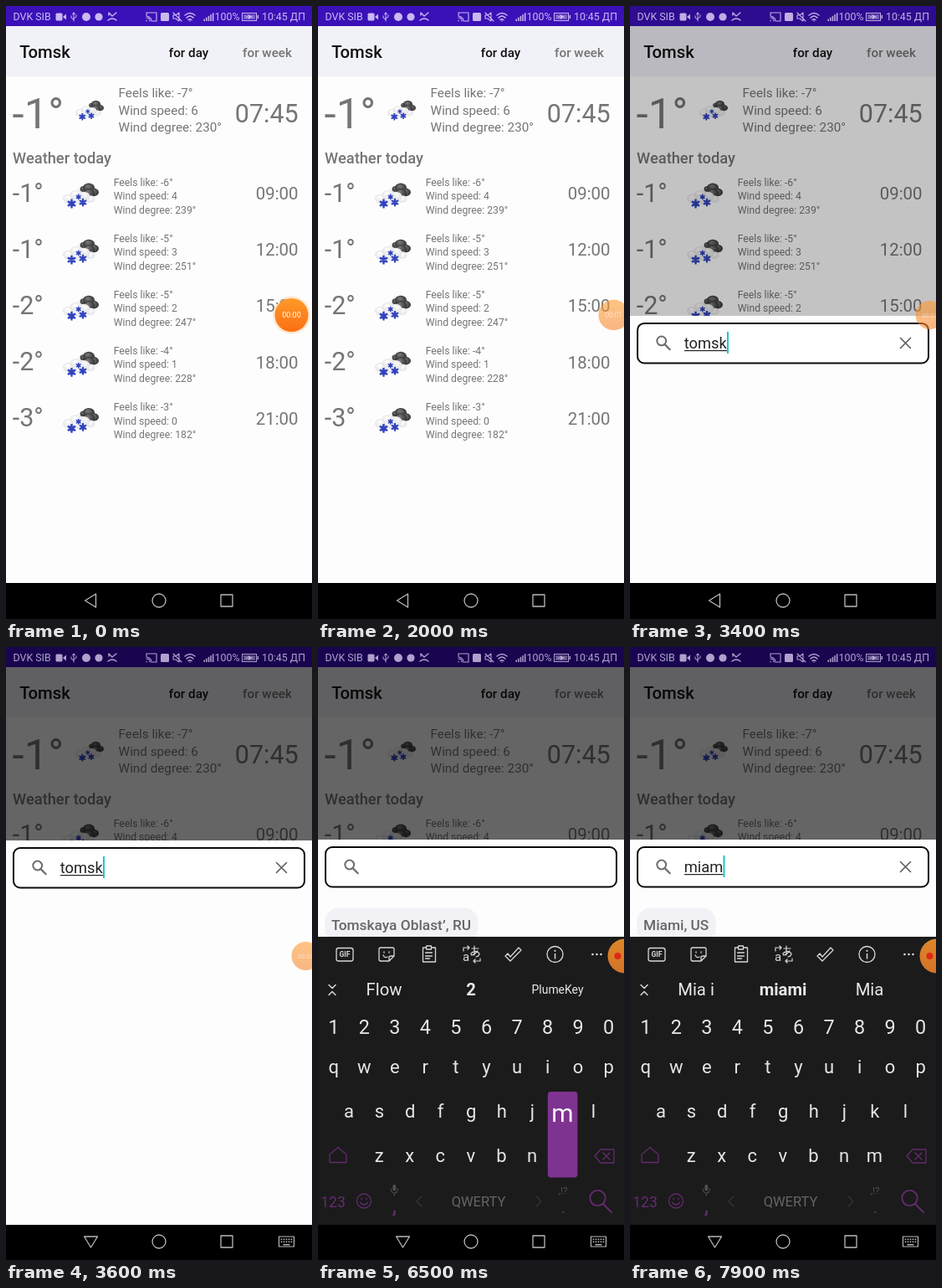
An HTML page with a canvas for the animation above (8 s loop, 366 by 732 pixels).

```html
<!DOCTYPE html>
<html lang="en">
<head>
<meta charset="utf-8">
<title>Weather app</title>
<style>
html, body { margin: 0; width: 100%; height: 100%; overflow: hidden; background: #000; }
canvas { display: block; width: 366px; height: 732px; }
</style>
</head>
<body>
<canvas id="stage"></canvas>
<script>
const W = 366, H = 732, LOOP = 8000;
const canvas = document.getElementById('stage');
const c = canvas.getContext('2d');
const dpr = window.devicePixelRatio || 1;
canvas.width = W * dpr;
canvas.height = H * dpr;

const GREY = '#757575', PURPLE = '#642b70', KEY = '#e6e6e6';
const clamp = v => Math.max(0, Math.min(1, v));
const span = (t, a, b) => clamp((t - a) / (b - a));
const easeOut = p => 1 - (1 - p) ** 3;
const mix = (a, b, p) => a + (b - a) * p;

function font(size, weight = 400) {
  c.font = `${weight} ${size}px Roboto, "Open Sans", sans-serif`;
}
function text(s, x, y, size, color = GREY, weight = 400, align = 'left') {
  font(size, weight);
  c.fillStyle = color;
  c.textAlign = align;
  c.fillText(s, x, y);
}
function rect(x, y, w, h, color) {
  c.fillStyle = color;
  c.fillRect(x, y, w, h);
}
function round(x, y, w, h, r, color) {
  c.beginPath();
  c.roundRect(x, y, w, h, r);
  c.fillStyle = color;
  c.fill();
}
function dot(x, y, r, color) {
  c.beginPath();
  c.arc(x, y, r, 0, 7);
  c.fillStyle = color;
  c.fill();
}
function ring(x, y, r, color, lw = 1.3) {
  c.beginPath();
  c.arc(x, y, r, 0, 7);
  c.strokeStyle = color;
  c.lineWidth = lw;
  c.stroke();
}
// Strokes an SVG path placed around a centre point
function icon(x, y, d, color, lw = 1.3) {
  c.save();
  c.translate(x, y);
  c.strokeStyle = color;
  c.lineWidth = lw;
  c.lineCap = c.lineJoin = 'round';
  c.stroke(new Path2D(d));
  c.restore();
}

// Flattened puff, shaded from the upper left
function puff(x, y, r, light, dark) {
  c.save();
  c.translate(x, y);
  c.scale(1, .78);
  const g = c.createRadialGradient(-r * .2, -r * .4, r * .1, 0, 0, r);
  g.addColorStop(0, light);
  g.addColorStop(1, dark);
  dot(0, 0, r, g);
  c.restore();
}
function flake(x, y, r) {
  c.strokeStyle = '#3244bd';
  c.lineWidth = r * .42;
  c.beginPath();
  for (let i = 0; i < 6; i++) {
    const a = (i + .5) * Math.PI / 3;
    c.moveTo(x, y);
    c.lineTo(x + r * Math.cos(a), y + r * Math.sin(a));
  }
  c.stroke();
  ring(x, y, r * .55, 'rgba(50,68,189,.55)', r * .3);
}
function snowCloud(x, y, k) {
  c.save();
  c.translate(x, y);
  c.scale(k, k);
  for (const [px, py, r] of [[25, 7, 4.5], [31, 5.5, 7], [37, 11, 6], [31, 12, 7]])
    puff(px, py, r, '#777', '#343434');
  for (const [px, py, r] of [[33, 19, 5.5], [7, 18.5, 7], [25, 16, 7.5], [16, 14, 7.5], [19, 19, 8]])
    puff(px, py, r, '#fff', '#e4e4e7');
  flake(10.5, 24.5, 5.4);
  flake(24, 23, 4.8);
  flake(18.7, 16.5, 3.4);
  c.restore();
}

const hours = [
  ['-1°', '-6°', 4, 239, '09:00'],
  ['-1°', '-5°', 3, 251, '12:00'],
  ['-2°', '-5°', 2, 247, '15:00'],
  ['-2°', '-4°', 1, 228, '18:00'],
  ['-3°', '-3°', 0, 182, '21:00']
];

function details(x, y, step, size, feels, speed, degree) {
  text('Feels like: ' + feels, x, y, size);
  text('Wind speed: ' + speed, x, y + step, size);
  text(`Wind degree: ${degree}°`, x, y + 2 * step, size);
}

function weather(t) {
  rect(0, 24, W, 665, '#fdfdfd');
  rect(0, 24, W, 60, '#f1f1f8');
  text('Tomsk', 16.3, 62, 20.3, '#111', 500);
  text('for day', 218.5, 60.5, 15.25, '#111', 500, 'center');
  text('for week', 312.5, 60.5, 15.25, GREY, 500, 'center');

  text('-1°', 7.6, 146, 50.8);
  snowCloud(83, 113, .79);
  details(134.6, 109, 20.5, 15.25, '-7°', 6, 230);
  text('07:45', 349.7, 138.5, 30.5, GREY, 400, 'right');
  text('Weather today', 8.1, 188, 18.3, GREY, 500);

  hours.forEach(([temp, feels, speed, degree, time], i) => {
    const y = 193 + i * 67.1;
    text(temp, 7.8, y + 41, 30.5);
    snowCloud(68, y + 18.5, 1);
    details(128.7, y + 21.5, 16.6, 12.2, feels, speed, degree);
    text(time, 349.5, y + 38.2, 20.4, GREY, 400, 'right');
  });

  // Overscroll glow at the top of the list
  const g = Math.min(span(t, 2450, 2580), 1 - span(t, 2640, 2840));
  if (g > 0) {
    const s = .37 * g;
    c.save();
    c.beginPath();
    c.rect(0, 193, W, 120);
    c.clip();
    c.beginPath();
    c.ellipse(155, 193 - 476 * s, 549, 549 * s, 0, 0, 7);
    c.fillStyle = 'rgba(98,0,200,.08)';
    c.fill();
    c.restore();
  }
}

function statusBar(dim) {
  rect(0, 0, W, 24, `rgb(${mix(58, 25, dim)},${mix(17, 4, dim)},${mix(184, 80, dim)})`);
  const col = `rgba(238,228,255,${mix(.8, .7, dim)})`;
  text('DVK SIB', 8.5, 17.3, 12.4, col);
  round(59.5, 8.5, 8, 9, 1.5, col);
  c.beginPath();
  c.moveTo(68, 13); c.lineTo(72, 9.5); c.lineTo(72, 16.5);
  c.fill();
  icon(81, 13, 'M0 5V-5M-1.5-3L0-5 1.5-3M0 3L-3 1V-1M0 2L3 0V-2', col, 1);
  dot(96, 13, 5, col);
  dot(111, 13, 4.6, col);
  icon(127, 13, 'M-4-5L0-1 5-5M-4-5V-2M-5 4Q0 0 5 4', col, 1.4);
  icon(174, 13, 'M-6-2V-5H6V5H1M-6 1Q-2 1-2 5M-6-1Q0 0 0 5M-6 4V5', col, 1.1);
  round(185, 8, 10, 10, 1.5, col);
  icon(205, 13, 'M-5-2H-2L2-5V5L-2 2H-5ZM-5-5L5 5', col, 1.1);
  icon(220, 14, 'M-6-3Q0-8 6-3M-4 0Q0-4 4 0M-2 2.5Q0 1 2 2.5M0 4V4', col, 1.5);
  for (let i = 0; i < 5; i++) rect(236.5 + i * 2.6, 15.5 - i * 1.8, 1.5, 2.5 + i * 1.8, col);
  text('100%', 249.5, 17.3, 12.4, col);
  c.strokeStyle = col;
  c.lineWidth = 1;
  c.strokeRect(282.5, 8.5, 17, 9);
  rect(284, 10, 14, 6, 'rgba(238,228,255,.35)');
  rect(300.5, 11, 1.5, 4, col);
  icon(291, 13, 'M-4 0H4M-1-2L2 0-1 2', col, 1.1);
  text('10:45 ДП', 358, 17.3, 12.4, col, 400, 'right');
}

function navBar(t) {
  const ime = t >= 3500, col = '#b9b9b9', top = ime ? 690 : 689;
  rect(0, top, W, H - top, '#000');
  icon(101.5, 710, ime ? 'M-8-6H8L0 7Z' : 'M6-8V8L-7 0Z', col, 1.3);
  ring(183, 710, 8, col);
  icon(264, 710, 'M-7-7H7V7H-7Z', col);
  if (ime) {
    icon(335.5, 710, 'M-9-6H9V6H-9Z', col, 1.2);
    for (let r = 0; r < 2; r++)
      for (let i = 0; i < 5; i++) rect(328.7 + i * 3, 706.5 + r * 3, 1.6, 1.6, col);
    rect(331.5, 713, 8, 1.4, col);
  }
}

// [start, typed text, suggestions]
const typing = [
  [0, 'tomsk', ['tom', 'tomsk', 'Torviso']],
  [4700, '', ['Flow', '2', 'PlumeKey']],
  [6600, 'm', ['my', 'm', 'me']],
  [7000, 'mi', ['miss', 'mi', 'mine']],
  [7200, 'mia', ['Mia', 'mia', 'miami']],
  [7600, 'miam', ['Mia i', 'miami', 'Mia']]
];
// [from, to, letter, x, y]
const presses = [
  [6500, 6600, 'm', 292.5, 607],
  [6800, 7000, 'i', 275, 501],
  [7500, 7600, 'm', 292.5, 607],
  [7800, 7900, 'i', 275, 501]
];

function chip(label) {
  font(17.3, 500);
  const w = c.measureText(label).width;
  round(8, 311.5, w + 16.5, 41, 17, '#f1f1f6');
  text(label, 16, 338, 17.3, '#666', 500);
}

function sheet(t, typed, since) {
  const p = easeOut(span(t, 3300, 3590));
  c.save();
  c.translate(0, mix(502, 0, p) + (t < 3800 ? 1 : 0));
  rect(0, 230, W, 520, '#fdfdfd');
  c.beginPath();
  c.roundRect(9, 239, 348, 47.5, 8);
  c.fillStyle = '#fff';
  c.fill();
  c.strokeStyle = '#0a0a0a';
  c.lineWidth = 2;
  c.stroke();
  ring(37.7, 260, 5.4, '#6d6d6d', 2);
  icon(44.5, 267, 'M-2.6-2.6L3.2 3.2', '#6d6d6d', 2.2);
  text(typed, 64.8, 269, 18.3, '#222');
  const w = c.measureText(typed).width;
  if (typed) {
    rect(65, 271, w, 1.2, '#222');
    icon(329.5, 262.5, 'M-6-6L6 6M6-6L-6 6', '#5c5c5c', 1.6);
  }
  if (Math.floor((t - Math.max(since, 3600)) / 500) % 2 === 0 || t < 3600)
    rect(65 + w, 249, 2, 26, '#1fc6c4');
  if (t >= 4100 && t < 7000) chip('Tomskaya Oblast’, RU');
  if (t >= 7800) chip('Miami, US');
  c.restore();
}

function keyRow(keys, x, y, size) {
  [...keys].forEach((k, i) => text(k, x + i * 36.55, y, size, KEY, 400, 'center'));
}

function suggestion(s, x, weight) {
  font(20.3, weight);
  const size = 20.3 * Math.min(1, 62 / c.measureText(s).width);
  text(s, x, 409 + size * .34, size, '#e8e8e8', weight, 'center');
}

function toolbar() {
  const col = '#d8d8d8', y = 367;
  c.beginPath();
  c.roundRect(22, 359.5, 20, 15.5, 2.5);
  c.strokeStyle = col;
  c.lineWidth = 1.3;
  c.stroke();
  text('GIF', 32, 370.3, 8.5, col, 700, 'center');
  icon(82, y, 'M-7-8H7Q9-8 9-6V2L3 8H-7Q-9 8-9 6V-6Q-9-8-7-8M9 2H5Q3 2 3 4V8M-4 1Q-2 5 1 3M-3-3V-2M3-3V-2', col);
  icon(132.5, y, 'M-3-8H-7V9H8V-8H3M-3-10H3V-6H-3ZM-4-2H4M-4 2H4M-4 5H1', col);
  text('a', 177, 375, 15, col, 400, 'center');
  icon(187, 366, 'M-3-6H5M0-9V2M4-3Q-4 5-4 0 1-5 6 0 6 3 2 4', col, 1.2);
  icon(179, 361, 'M-5 2V-2H2M0-4L2-2 0 0', col, 1.2);
  icon(191, 374, 'M3-2V1H-5M-3-1L-5 1-3 3', col, 1.2);
  icon(233, y, 'M-9 2L-6-1-3 3 7-8 10-5-3 8Z', col);
  ring(283.5, y, 9.5, col);
  rect(282.8, 366, 1.5, 6.5, col);
  dot(283.5, 362.8, 1.1, col);
  for (let i = 0; i < 3; i++) dot(328.5 + i * 5, y, 1.3, col);
}

function keyboard(t, words) {
  const p = easeOut(span(t, 3700, 4000));
  if (p <= 0) return;
  c.save();
  c.translate(0, mix(344, 0, p));
  rect(0, 346, W, 344, '#1b1b1b');
  toolbar();
  icon(17, 409.5, 'M-4-6L0-2 4-6M-4 6L0 2 4 6', '#e0e0e0', 1.4);
  suggestion(words[0], 79, 400);
  suggestion(words[1], 183, 700);
  suggestion(words[2], 286.5, 400);

  keyRow('1234567890', 18.7, 461.8, 23.4);
  keyRow('qwertyuiop', 18.7, 508.5, 22);
  keyRow('asdfghjkl', 37, 561.5, 22);
  keyRow('zxcvbnm', 73.2, 614.5, 22);

  icon(24, 607, 'M0-9.5L10-1V8.5H-10V-1Z', PURPLE, 1.3);
  icon(343, 608, 'M-12 0L-5-8H11V8H-5ZM-2-4L6 4M6-4L-2 4', PURPLE, 1.3);
  text('123', 18, 668.5, 17.5, PURPLE, 400, 'center');
  ring(55, 661.5, 8.5, PURPLE, 1.3);
  icon(55, 661.5, 'M-4.5 2Q0 7 4.5 2M-3-3V-2M3-3V-2', PURPLE, 1.4);
  const dull = '#4f4f4f';
  round(89.3, 642, 4, 7.5, 2, dull);
  icon(91.3, 649, 'M-4-2Q-4 3 0 3 4 3 4-2M0 3V6', dull, 1.1);
  text(',', 91.5, 676, 22, PURPLE, 700, 'center');
  icon(121, 662, 'M3-6L-3 0 3 6', '#363636', 1.2);
  text('QWERTY', 192, 668, 16.5, '#656565', 400, 'center');
  icon(264, 662, 'M-3-6L3 0-3 6', '#363636', 1.2);
  text(',!?', 293, 653, 11.5, dull, 400, 'center');
  text('.', 293, 676, 18, dull, 400, 'center');
  ring(334.5, 658, 9.2, PURPLE, 1.8);
  icon(346, 670, 'M-5-5L5 5', PURPLE, 1.9);

  for (const [from, to, letter, x, y] of presses) {
    if (t < from || t >= to) continue;
    round(x - 17.7, y - 76, 35.6, 102.5, 4, '#7f3391');
    text(letter, x, y - 40, 30, '#fff', 400, 'center');
  }
  c.restore();
}

function bubble(t) {
  const docked = t >= 5700;
  const hide = easeOut(span(t, 1900, 2300));
  const x = docked ? 367 : mix(mix(341.5, 347, span(t, 1550, 1700)), 358.5, hide);
  const r = docked ? 20.5 : mix(20, 17, hide);
  const alpha = mix(mix(1, .58, span(t, 1550, 1700)), .85, span(t, 3700, 4000));
  c.save();
  c.globalAlpha = alpha;
  if (t < 1900) dot(x, 369, r + 2.5, 'rgba(255,190,130,.35)');
  const g = c.createLinearGradient(0, 369 - r, 0, 369 + r);
  g.addColorStop(0, '#ff9a2a');
  g.addColorStop(1, t < 1600 ? '#fb6f12' : '#f5822a');
  dot(x, 369, r, g);
  if (docked) dot(358.5, 369, 4, '#e01818');
  else {
    const sec = Math.max(0, Math.floor((t - 250) / 1000));
    text('00:0' + sec, x, 372.2, mix(9, 7.6, hide), '#fff', 400, 'center');
  }
  c.restore();
}

function draw(t) {
  c.setTransform(dpr, 0, 0, dpr, 0, 0);
  const dim = span(t, 3300, 3560);
  const [since, typed, words] = typing.filter(s => t >= s[0]).pop();
  weather(t);
  if (dim > 0) rect(0, 24, W, 665, `rgba(0,0,0,${.6 * dim})`);
  statusBar(dim);
  if (t >= 3300) {
    sheet(t, typed, since);
    keyboard(t, words);
  }
  navBar(t);
  bubble(t);
}

const start = performance.now();
function tick() {
  draw((performance.now() - start) % LOOP);
  requestAnimationFrame(tick);
}
tick();
</script>
</body>
</html>
```
